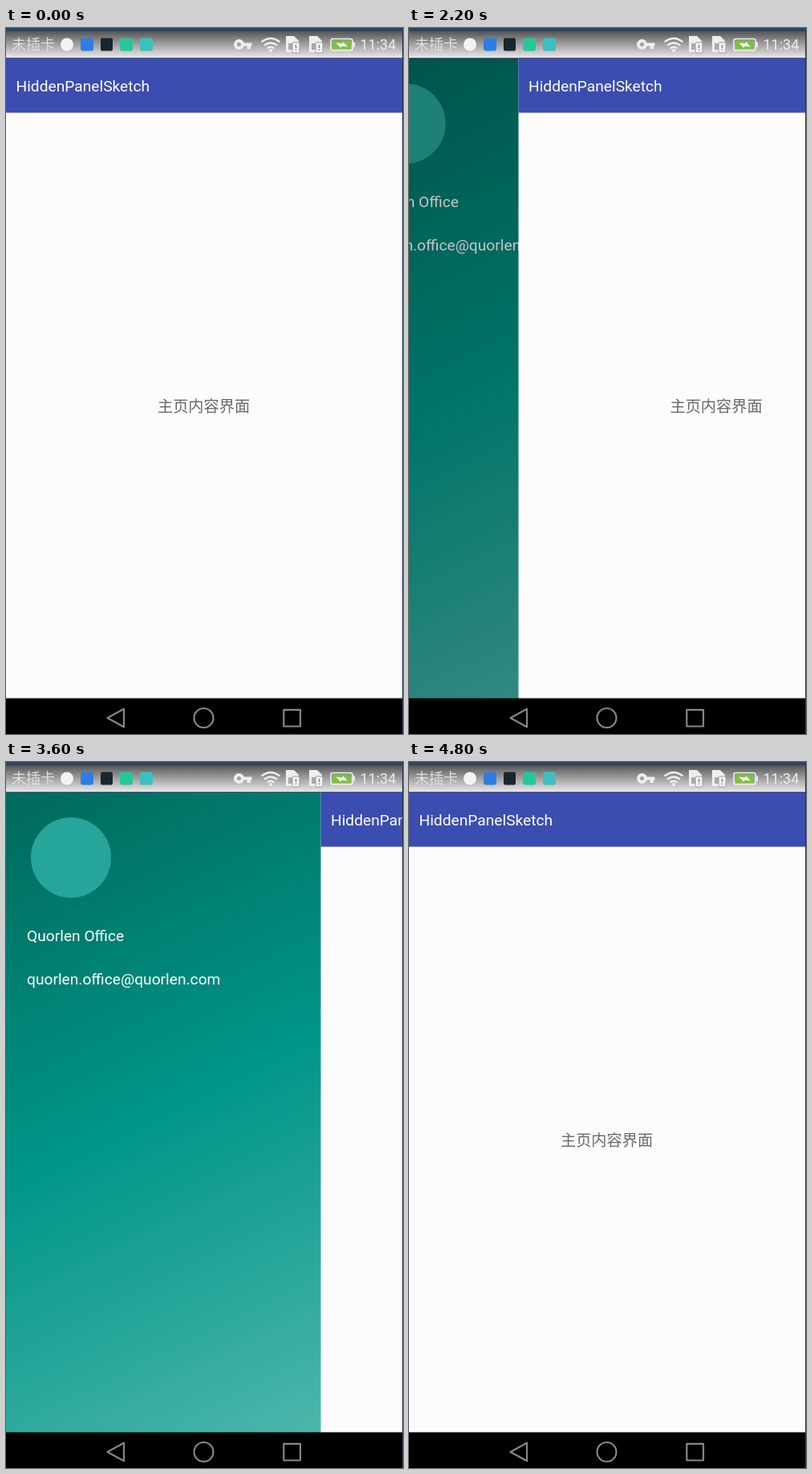
An HTML page for the animation above (6000 ms loop, 495 by 879 pixels).

```html
<!DOCTYPE html>
<html lang="zh-CN">
<head>
<meta charset="utf-8">
<title>Drawer</title>
<style>
  html, body { margin: 0; width: 100%; height: 100%; overflow: hidden; background: #000; }
  svg { display: block; width: 495px; height: 879px; }
  text { font-family: Roboto, "Noto Sans CJK SC", "Noto Sans CJK", sans-serif; font-size: 19.2px; }
</style>
</head>
<body>
<svg viewBox="0 0 495 879">
  <defs>
    <linearGradient id="statusFill" x1="0" y1="0" x2="0" y2="1">
      <stop offset="0" stop-color="#555"/>
      <stop offset=".3" stop-color="#868585"/>
      <stop offset="1" stop-color="#eeecec"/>
    </linearGradient>
    <linearGradient id="menuFill" gradientUnits="userSpaceOnUse" x1="0" y1="38" x2="392" y2="835">
      <stop offset="0" stop-color="#00695c"/>
      <stop offset=".5" stop-color="#009688"/>
      <stop offset="1" stop-color="#4db6ac"/>
    </linearGradient>
    <g id="sim">
      <path d="M0 0h10l6 6v14H0z" fill="#eee"/>
      <path d="M3 9h5v8H3z" fill="#aaa"/>
      <rect x="8" y="8" width="9" height="13" rx="1.5" fill="#f4f4f4" stroke="#999"/>
      <path d="M12.5 11v4m0 1.500v1.500" stroke="#888" stroke-width="1.600"/>
    </g>
  </defs>

  <g id="menu">
    <rect y="38" width="393" height="797" fill="url(#menuFill)"/>
    <circle cx="81" cy="119" r="50" fill="#26a69a"/>
    <g fill="#fff">
      <text x="26" y="223">Quorlen Office</text>
      <text x="26" y="276.500">quorlen.office@quorlen.com</text>
    </g>
  </g>
  <rect id="shade" y="38" width="495" height="797"/>

  <g id="page">
    <rect y="38" width="495" height="797" fill="#fcfcfc"/>
    <rect y="38" width="495" height="67.500" fill="#3b4db1"/>
    <text x="12.500" y="79" fill="#fff">HiddenPanelSketch</text>
    <text x="189" y="478" fill="#686868" font-weight="500">主页内容界面</text>
  </g>

  <rect width="495" height="4" fill="#30445c"/>
  <rect y="4" width="495" height="34" fill="url(#statusFill)"/>
  <rect y="37" width="495" height="1" fill="#4c5480"/>
  <text x="7" y="27" fill="#dedede" style="font-size:18px">未插卡</text>
  <circle cx="76" cy="20.500" r="8" fill="#f3f3f0"/>
  <rect x="93" y="12.500" width="16" height="16" rx="3" fill="#2f7de1"/>
  <rect x="118" y="12.500" width="15" height="16" rx="2" fill="#18262d"/>
  <rect x="142" y="12.500" width="16" height="16" rx="3" fill="#25c79a"/>
  <rect x="167" y="12.500" width="16" height="16" rx="3" fill="#3bbfc0"/>

  <circle cx="290.500" cy="20.500" r="4.500" fill="none" stroke="#eee" stroke-width="4"/>
  <path d="M295 18.500h11.500v4H305v3.500h-4.500v-3.500H295z" fill="#eee"/>
  <g fill="none" stroke="#f0f0f0" stroke-width="2.200">
    <path d="M318.500 17.500q11.500-9 23 0M322 21.700q8-6.400 16 0M325.500 25.500q4.500-3.600 9 0"/>
  </g>
  <circle cx="330" cy="28" r="2" fill="#f0f0f0"/>
  <path id="traffic" d="M317 28l1.700-4 1.700 4zM320 24.500h3l-1.500 3.500z" fill="#f4f4f4"/>
  <use href="#sim" x="349" y="10"/>
  <use href="#sim" x="378" y="10"/>
  <rect x="405" y="13.500" width="27" height="14.500" rx="2.500" fill="none" stroke="#eee" stroke-width="1.600"/>
  <rect x="433" y="17.500" width="2" height="6.500" fill="#eee"/>
  <rect x="407" y="15.500" width="23" height="10.500" fill="#7fc13f"/>
  <path d="M411.500 18.500l8 1 .5-2.500 6 6.500-8-1-.5 2.500z" fill="#fff"/>
  <text x="441.500" y="27.300" fill="#ececec" style="font-size:18px">11:34</text>

  <rect y="834.500" width="495" height="44.500"/>
  <g fill="none" stroke="#898583" stroke-width="2.200" stroke-linejoin="round">
    <path d="M126.500 859L147 847.700v22.600z"/>
    <circle cx="246.500" cy="859" r="12"/>
    <rect x="346.300" y="848.800" width="20.700" height="20.700"/>
  </g>
  <rect x="494" width="1" height="879" fill="#2b3b50"/>
</svg>
<script>
  const LOOP = 6000, STEP = 100, MENU_WIDTH = 392.5;
  const PARALLAX = 1 / 3, FADE = 0.35;
  const drags = [
    { start: 1800, offsets: [8, 36, 68, 102, 136.5, 180, 224, 268, 314, 354, 382, MENU_WIDTH] },
    { start: 3600, offsets: [MENU_WIDTH, 384, 360, 326, 288, 250, 212, 173.5, 138, 104, 50, 12, 0] }
  ];
  const [menu, shade, page, traffic] =
    ["menu", "shade", "page", "traffic"].map(id => document.getElementById(id));

  function offsetAt(time) {
    const drag = drags.filter(d => d.start <= time).pop();
    if (!drag) return 0;
    const step = Math.floor((time - drag.start) / STEP);
    return drag.offsets[Math.min(step, drag.offsets.length - 1)];
  }

  const between = (time, from, to) => time >= from && time < to;
  const shift = (node, x) => node.setAttribute("transform", `translate(${x} 0)`);

  function draw() {
    const time = performance.now() % LOOP;
    const x = offsetAt(time);
    shift(page, x);
    shift(menu, (x - MENU_WIDTH) * PARALLAX);
    shade.setAttribute("opacity", FADE * (1 - x / MENU_WIDTH));
    const busy = between(time, 200, 1200) || between(time, 4200, 4800);
    traffic.setAttribute("visibility", busy ? "visible" : "hidden");
    requestAnimationFrame(draw);
  }
  draw();
</script>
</body>
</html>
```
